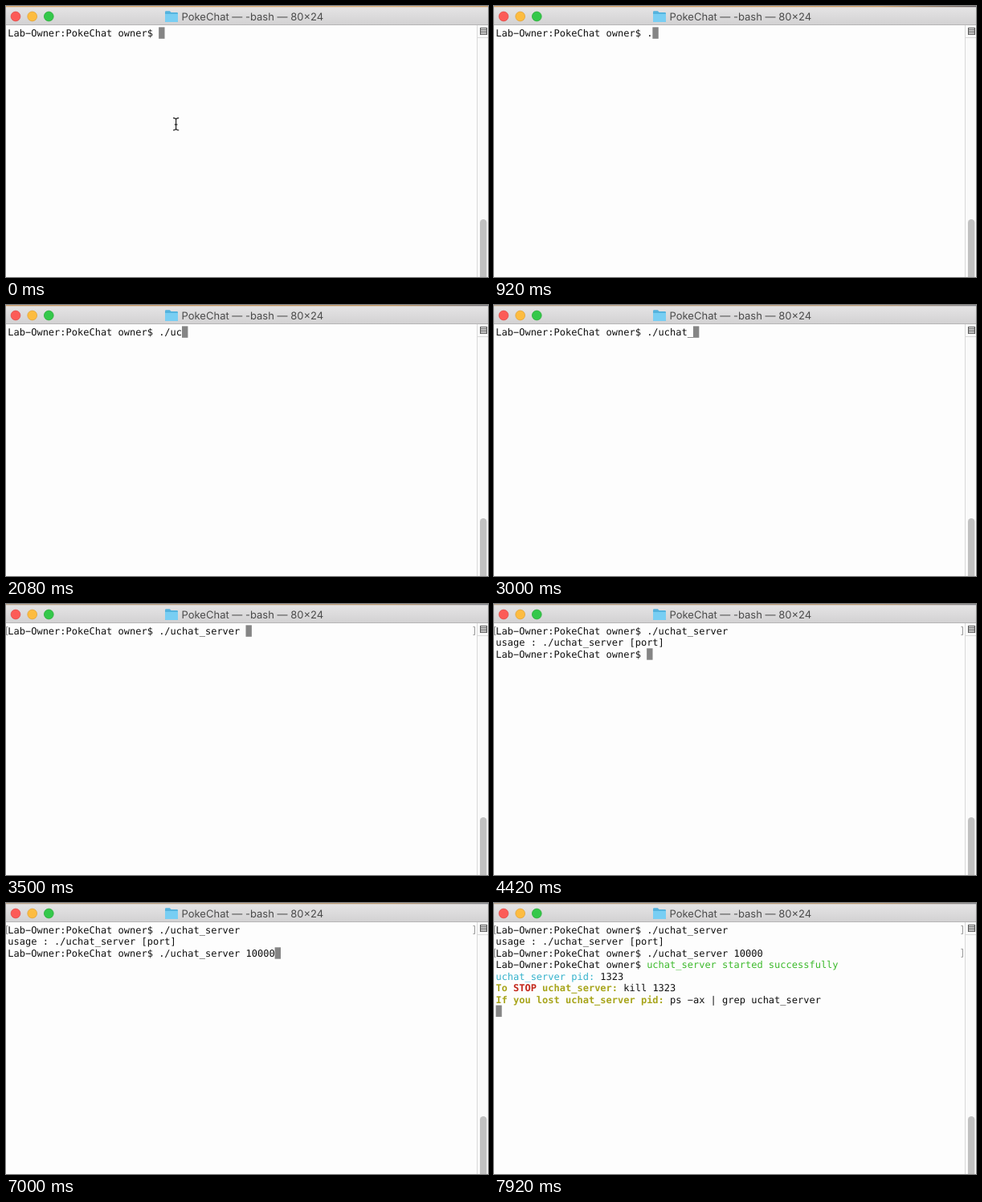
Write an HTML page that moves like this. It is 600 px wide and 338 px high and loops after 8 s.

```html
<!DOCTYPE html>
<html lang="en">
<head>
<meta charset="utf-8">
<title>Terminal</title>
<style>
  html, body { margin: 0; width: 100%; height: 100%; overflow: hidden; background: #fdfdfd; }
  svg { display: block; width: 100vw; height: 100vh; }
  text { white-space: pre; text-rendering: geometricPrecision; }
  .title { font: 13px Inter, Roboto, sans-serif; fill: #4b4b4b; }
  #screen text { font: 12px "DejaVu Sans Mono", monospace; fill: #101010; }
  #screen .bold { font-weight: bold; }
  .mark { fill: none; stroke: #999; }
</style>
</head>
<body>
<svg viewBox="0 0 600 338" preserveAspectRatio="none">
  <defs>
    <linearGradient id="bar" x2="0" y2="1">
      <stop stop-color="#e6e5e6"/><stop offset="1" stop-color="#d2d1d2"/>
    </linearGradient>
    <linearGradient id="desktop">
      <stop id="deskLeft"/><stop id="deskMid" offset=".8"/><stop id="deskRight" offset="1"/>
    </linearGradient>
  </defs>
  <rect width="600" height="338" fill="#fdfdfd"/>

  <!-- Title bar -->
  <rect width="600" height="24" fill="url(#bar)"/>
  <rect width="600" height="1.3" fill="url(#desktop)"/>
  <rect y="23" width="600" height="1" fill="#b5b4b5"/>
  <g stroke-width=".7">
    <circle cx="12" cy="13" r="5.9" fill="#fc5b57" stroke="#df4744"/>
    <circle cx="32.7" cy="13" r="5.9" fill="#fdbc40" stroke="#dea034"/>
    <circle cx="53.3" cy="13" r="5.9" fill="#34c84a" stroke="#27a935"/>
  </g>
  <path d="M198 7.5q0-1.2 1.2-1.2h4.6l1.8 1.7h7.2q1.2 0 1.2 1.2v9.6q0 1.2-1.2 1.2h-13.6q-1.2 0-1.2-1.2z" fill="#54b3de"/>
  <path d="M198 10h16v8.8q0 1.2-1.2 1.2h-13.6q-1.2 0-1.2-1.2z" fill="#78cef3"/>
  <text class="title" x="218.5" y="17.7">PokeChat — -bash — 80×24</text>

  <!-- Scroll bar -->
  <rect x="586" y="24" width="14" height="314" fill="#fafafa"/>
  <path d="M586.5 24V338M586 39.5H600" stroke="#d9d9d9"/>
  <rect x="590.5" y="27.5" width="8" height="8" fill="#fff" stroke="#555"/>
  <path d="M591 29.5h7M591 31.5h7M591 33.5h7" stroke="#555"/>
  <rect x="590" y="266" width="8.4" height="90" rx="4.2" fill="#c1c1c1"/>

  <g id="screen"></g>
  <rect id="cursor" width="7.4" height="14.4" fill="#858585"/>
  <path id="pointer" d="M208 139.7q3.6 0 3.6 2.4v10.4q0 2.4-3.6 2.4M215.2 139.7q-3.6 0-3.6 2.4M215.2 154.9q-3.6 0-3.6-2.4M209.8 147.8h3.6" fill="none" stroke="#222" stroke-width="1.2"/>
</svg>
<script>
const LOOP = 8000, LEFT = 2.3, CELL = 7.224, LINE = 14.45;
const PROMPT = 'Lab-Owner:PokeChat owner$ ';
const OLIVE = '#a8a51c', RED = '#c3271b', CYAN = '#36b3cc', GREEN = '#3dba2c';
const byId = id => document.getElementById(id);

// [time, text on the command line]
const firstCommand = [
  [0, ''], [670, '.'], [1670, './'], [1920, './u'], [2080, './uc'], [2170, './uch'],
  [2250, './ucha'], [2420, './uchat'], [3000, './uchat_'], [3250, './uchat_s'], [3500, './uchat_server ']
];
const secondCommand = [
  [4420, ''], [5170, './uchat_server '], [6000, './uchat_server 1'], [6250, './uchat_server 10'],
  [6670, './uchat_server 100'], [6830, './uchat_server 1000'], [7000, './uchat_server 10000']
];
const latest = (steps, t) => steps.filter(([time]) => time <= t).pop()[1];

const run = (text, color, bold) => ({ text, color, bold });
const plain = text => [run(text)];

// Each row is a list of styled runs; the cursor sits at the end of the last row.
function rowsAt(t) {
  const rows = [plain(PROMPT + latest(firstCommand, t))];
  if (t < 4330) return rows;
  if (t < 4420) return [...rows, plain('')];
  rows.push(plain('usage : ./uchat_server [port]'), plain(PROMPT + latest(secondCommand, t)));
  if (t < 7670) return rows;
  if (t < 7750) return [...rows, plain('')];
  if (t < 7830) return [...rows, plain(PROMPT)];
  return [...rows,
    [run(PROMPT), run('uchat_server started successfully', GREEN)],
    [run('uchat_server pid:', CYAN), run(' 1323')],
    [run('To ', OLIVE, true), run('STOP', RED, true), run(' uchat_server:', OLIVE, true), run(' kill 1323')],
    [run('If you lost uchat_server pid:', OLIVE, true), run(' ps -ax | grep uchat_server')],
    plain('')
  ];
}

function runMarkup({ text, color, bold }) {
  const style = color ? ` style="fill:${color}"` : '';
  // The terminal face has a wide hyphen.
  return `<tspan${style}${bold ? ' class="bold"' : ''}>${text.replace(/-/g, '\u2212')}</tspan>`;
}

function rowMarkup(row, i) {
  return `<text x="${LEFT}" y="${37.8 + i * LINE}">${row.map(runMarkup).join('')}</text>`;
}

function bracketMarkup(i) {
  const y = 28.5 + i * LINE;
  return `<path class="mark" d="M2.5 ${y}h-2v10h2M581.5 ${y}h2v10h-2"/>`;
}

function desktopColors(t) {
  if (t < 500) return ['#d9a468', '#dcae78', '#c99a66'];
  if (t < 1670) return ['#d6a268', '#cf9c62', '#5e5a60'];
  if (t < 2250) return ['#c99a68', '#c0945f', '#77757a'];
  return ['#b9a48c', '#bb9a74', '#85868c'];
}

let shown = '';
function draw(now) {
  const t = now % LOOP;
  const rows = rowsAt(t);
  const brackets = [[0, 3500], [2, 7670]].filter(([, time]) => t >= time);
  const markup = rows.map(rowMarkup).join('') + brackets.map(([i]) => bracketMarkup(i)).join('');
  if (markup !== shown) byId('screen').innerHTML = shown = markup;

  const column = rows.at(-1).reduce((sum, r) => sum + r.text.length, 0);
  byId('cursor').setAttribute('x', LEFT + column * CELL);
  byId('cursor').setAttribute('y', 26.4 + (rows.length - 1) * LINE);
  byId('pointer').style.display = t < 670 ? '' : 'none';

  const colors = desktopColors(t);
  ['deskLeft', 'deskMid', 'deskRight'].forEach((id, i) => byId(id).setAttribute('stop-color', colors[i]));
  requestAnimationFrame(draw);
}
draw(0);
</script>
</body>
</html>
```
